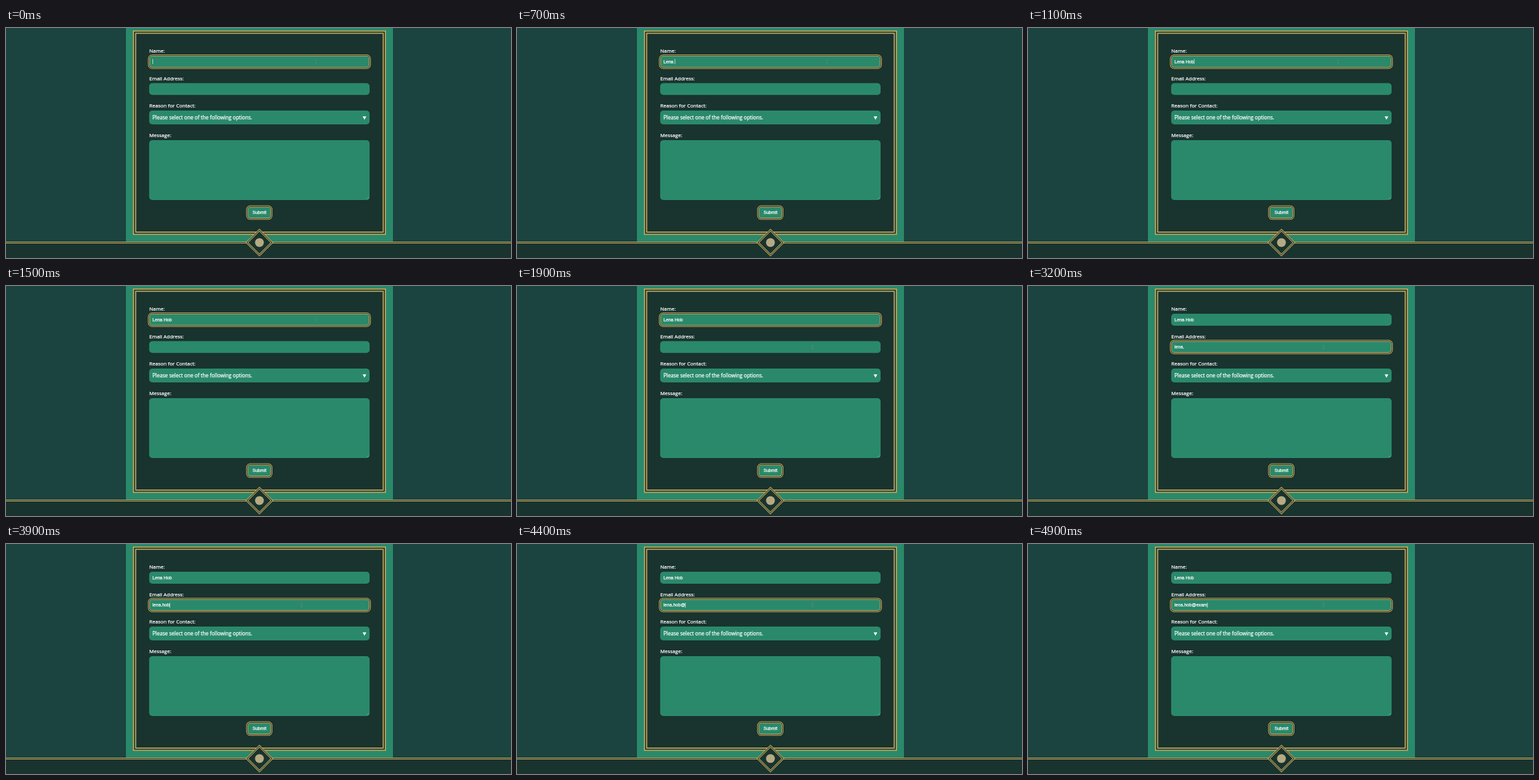
Recreate the animation shown at these times as an HTML page with a canvas. Size 800 px wide and 365 px high, loop 5 s.

```html
<!DOCTYPE html>
<html lang="en">
<head>
<meta charset="utf-8">
<title>Contact form</title>
<style>
  html, body { margin: 0; width: 100%; height: 100%; overflow: hidden; background: #1b433f; }
  canvas { display: block; }
</style>
</head>
<body>
<canvas id="stage" width="800" height="365"></canvas>
<script>
const ctx = document.getElementById('stage').getContext('2d');
const LOOP = 5000, STEP = 100, BLINK = 500, SWITCH = 2000;
const GREEN = '#2a896b', DARK = '#19332e', SIDE = '#1b433f', GOLD = '#c4a85c', WHITE = '#ffffff';
const LABEL = '8px "Open Sans", "Noto Sans", sans-serif';
const OPTION = '8.1px "Open Sans", "Noto Sans", sans-serif';
const INPUT = '7.1px "Liberation Sans", Arial, sans-serif';

// Each entry gives the text and the time of every keystroke.
const nameField = {
  y: 44, h: 19, baseline: 55.5, text: 'Lena Hob', focus: 0,
  keys: [200, 300, 400, 500, 600, 800, 900, 1000]
};
const emailField = {
  y: 87.5, h: 18.7, baseline: 99.4, text: 'lena.hob@exam', focus: SWITCH,
  keys: [2300, 2500, 2600, 2600, 2700, 3500, 3600, 3800, 4200, 4500, 4600, 4700, 4800]
};

function box(x, y, w, h, color) {
  ctx.fillStyle = color;
  ctx.fillRect(x, y, w, h);
}

function round(x, y, w, h, r, color) {
  ctx.fillStyle = color;
  ctx.beginPath();
  ctx.roundRect(x, y, w, h, r);
  ctx.fill();
}

// A thin outline gives the small type its weight.
function write(text, x, y, font = LABEL) {
  ctx.font = font;
  ctx.fillStyle = ctx.strokeStyle = WHITE;
  ctx.lineWidth = 0.25;
  ctx.fillText(text, x, y);
  ctx.strokeText(text, x, y);
}

function polygon(points, color) {
  ctx.fillStyle = color;
  ctx.beginPath();
  for (const [x, y] of points) ctx.lineTo(x, y);
  ctx.closePath();
  ctx.fill();
}

// Filled box with a double border: two gold lines and an equal dark gap.
function doubleBox(x, y, w, h, r, border, fill) {
  const line = border / 3;
  const inset = d => [x + d, y + d, w - 2 * d, h - 2 * d, Math.max(0, r - d)];
  round(...inset(line / 2), DARK);
  round(...inset(border - line / 2), fill);
  ctx.strokeStyle = GOLD;
  ctx.lineWidth = line;
  for (const d of [line / 2, border - line / 2]) {
    ctx.beginPath();
    ctx.roundRect(...inset(d));
    ctx.stroke();
  }
}

function drawPage() {
  box(0, 0, 800, 365, SIDE);
  box(190, 0, 423, 340, GREEN);
  doubleBox(201, 4, 401, 324.3, 0, 5.3, DARK);
}

function drawFooter() {
  box(0, 339, 800, 26, DARK);
  box(0, 339, 800, 1, GOLD);
  box(0, 341, 800, 1, GOLD);
  ctx.save();
  ctx.translate(401.5, 340.5);
  ctx.rotate(Math.PI / 4);
  doubleBox(-15.6, -15.6, 31.2, 31.2, 0, 3.2, DARK);
  ctx.restore();
  ctx.fillStyle = '#b5aa83';
  ctx.beginPath();
  ctx.arc(401.5, 340.5, 7, 0, Math.PI * 2);
  ctx.fill();
}

function drawField(field, t, active) {
  const { y, h, baseline, text, keys, focus } = field;
  if (active) doubleBox(224.8, y - 2.1, 353.2, h + 4.2, 7, 3.2, GREEN);
  else round(226.8, y, 349.2, h, 5, GREEN);

  const count = keys.filter(k => k <= t).length;
  const typed = text.slice(0, count);
  write(typed, 232, baseline, INPUT);
  const last = count ? keys[count - 1] : focus;
  if (active && (t - last) % (2 * BLINK) < BLINK)
    box(232 + ctx.measureText(typed).width, baseline - 6.3, 0.7, 8, WHITE);
}

function drawForm(t) {
  write('Name:', 227, 39);
  write('Email Address:', 227, 82.7);
  write('Reason for Contact:', 227, 126.4);
  write('Message:', 227, 172.7);

  drawField(nameField, t, t < SWITCH);
  drawField(emailField, t, t >= SWITCH);

  round(226.8, 131, 349.2, 22, 5, GREEN);
  write('Please select one of the following options.', 232, 145.4, OPTION);
  polygon([[565, 140.2], [570.8, 140.2], [567.9, 145.6]], WHITE);

  round(226.8, 178, 349.2, 95, 5, GREEN);
  ctx.strokeStyle = '#98b5a8';
  ctx.lineWidth = 0.6;
  ctx.beginPath();
  ctx.moveTo(571.5, 272);
  ctx.lineTo(575, 268.5);
  ctx.moveTo(573.5, 272);
  ctx.lineTo(575, 270.5);
  ctx.stroke();

  doubleBox(380.5, 281.5, 41.5, 22.8, 6.5, 3.2, GREEN);
  write('Submit', 390.4, 295.4, INPUT);
}

function drawPointer(t) {
  const p = Math.min(1, Math.max(0, (t - 1600) / 300));
  const e = p * p * (3 - 2 * p);
  const x = 491 - 23 * e, y = 54 + 43 * e;
  const color = '#658569';
  box(x - 0.4, y - 3.5, 0.8, 7, color);
  box(x - 1.2, y - 3.8, 2.4, 0.5, color);
  box(x - 1.2, y + 3.3, 2.4, 0.5, color);
}

function draw(t) {
  drawPage();
  drawForm(t);
  drawFooter();
  drawPointer(t);
}

const start = performance.now();
function tick() {
  const t = (performance.now() - start) % LOOP;
  draw(Math.floor(t / STEP) * STEP);
  requestAnimationFrame(tick);
}
tick();
</script>
</body>
</html>
```
